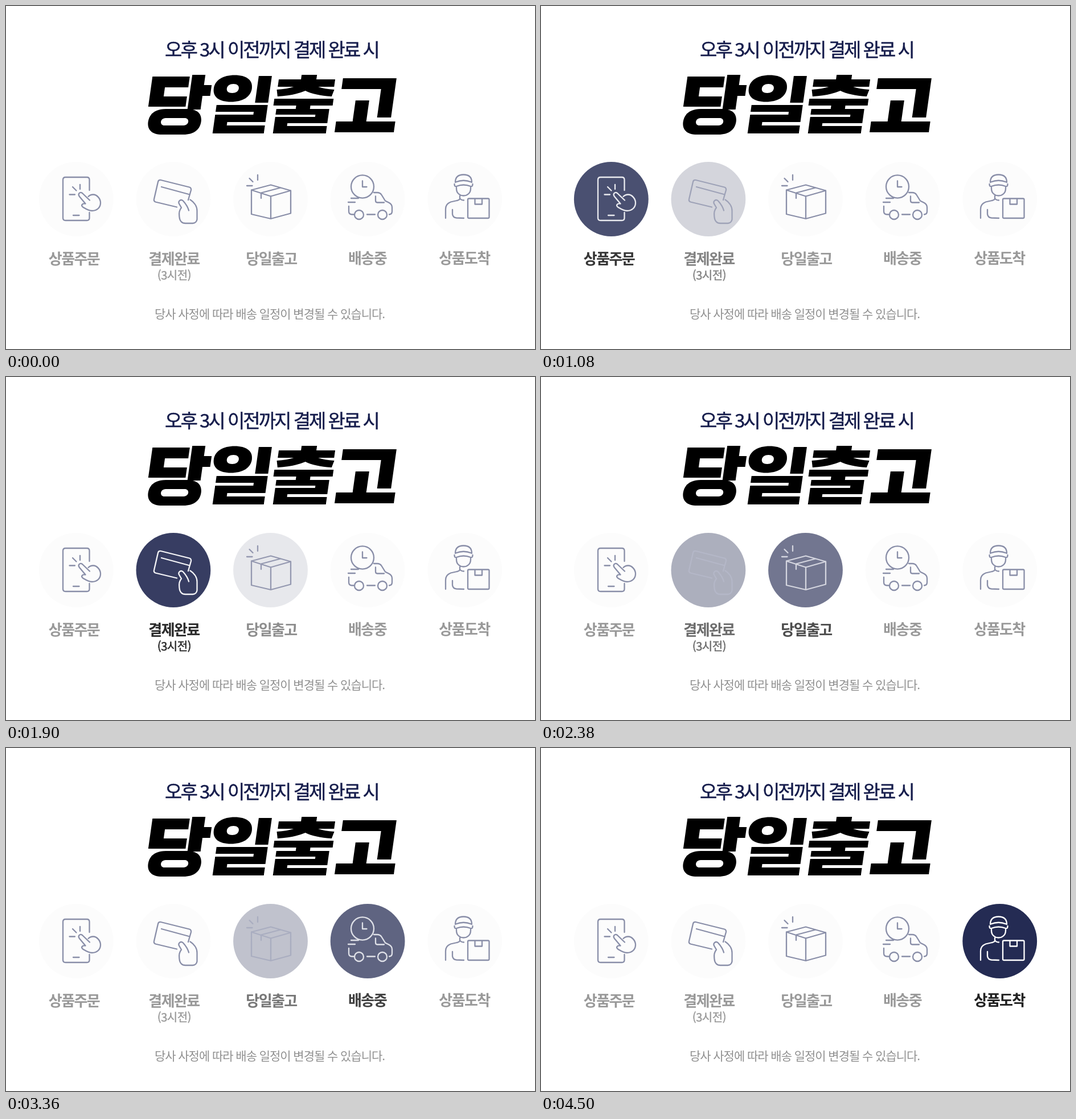
Write an HTML page that moves like this. It is 929x603 px and loops after 4.6 s.

```html
<!DOCTYPE html>
<html lang="ko">
<head>
<meta charset="utf-8">
<title>당일출고</title>
<style>
  html, body { margin: 0; width: 100%; height: 100%; overflow: hidden; background: #fff; }
  svg { display: block; width: 929px; height: 603px; }
  text { font-family: "Noto Sans CJK KR", "Noto Sans CJK", "Noto Sans KR", sans-serif; text-anchor: middle; }
  .lead { font-size: 33px; font-weight: 500; letter-spacing: -3px; fill: #161d4c; stroke: #161d4c; stroke-width: .5px; }
  .note { font-size: 21px; letter-spacing: -1.05px; fill: #909090; }
  .label { font-size: 26px; font-weight: 700; letter-spacing: -1.6px; }
  .sub { font-size: 20px; font-weight: 500; letter-spacing: -.4px; stroke-width: .4px; }
  .icon { fill: none; stroke-width: 2.3px; stroke-linecap: round; stroke-linejoin: round; }
  .off .disc { fill: #fcfcfc; }
  .off .icon { stroke: #898ea8; }
  .off text { fill: #999; }
  .off .sub { stroke: #999; }
  .on .disc { fill: #242b53; }
  .on .icon { stroke: #fff; }
  .on text { fill: #222; }
  .on .sub { stroke: #222; }
</style>
</head>
<body>
<svg viewBox="0 0 929 603">
  <text class="lead" x="466.5" y="89">오후 3시 이전까지 결제 완료 시</text>

  <!-- slanted display lettering -->
  <g role="img" aria-label="당일출고" transform="translate(31.2 0) skewX(-8)" fill-rule="evenodd">
    <path d="M243.5 124H309V143H268V159H309V177H243.5Z
             M313 121H336V139H349.5V158H336V182H313Z"/>
    <path d="M275 181H312C331 181 340 190 340 203.500S331 226 312 226H275C256 226 247 217 247 203.500S256 181 275 181Z
             M277 197C267 197 267 210 277 210H310C320 210 320 197 310 197Z"/>
    <path d="M354 145C354 130 367 121.500 387.500 121.500S421 130 421 145S408 168.500 387.500 168.500S354 160 354 145Z
             M377 145C377 150 381 153 387.500 153S398 150 398 145S394 137 387.500 137S377 140 377 145Z
             M430 123H453V170H430Z
             M363 174H453V204H386V210H453V224H363V191H430V186H363Z"/>
    <path d="M505 121H532V130H505Z"/>
    <path d="M466 129H565V142H537Q548 146 566 147L563 159Q533 157 515.500 149Q498 157 468 159L465 147Q483 146 494 142H466Z"/>
    <path d="M463 163H567V175H528V182H503V175H463Z"/>
    <path d="M469 181H562V206H492V211H562V224H469V195H539V191H469Z"/>
    <path d="M578.500 127H672.500V196H648V146H578.500Z
             M606 166H630V203H681V222H577V203H606Z"/>
  </g>

  <g id="steps"></g>

  <text class="note" x="463" y="548.500">당사 사정에 따라 배송 일정이 변경될 수 있습니다.</text>
</svg>

<script>
const phone = `
  M146.500 324V305.500Q146.500 301 142 301H104.500Q100 301 100 305.500V372.500Q100 377 104.500 377H142Q146.500 377 146.500 372.500V363
  M118 368H128.500 M117 318L123.500 324.500 M130 314V322 M111.500 331.500H121
  M147 341.500L134 329C130 326 125.500 330 129 335L139.500 347.500C134 346.500 131 350.500 135 353.500
  C140 356.500 144 360 151 360C160 360 166 354 166 346
  C166 339 160 331.500 153 331.500C149 331.500 146.500 333 144.500 335`;

const card = `
  M300 353.500L262.500 344.500Q259 343 260 339.500L267 309Q268 305 272 306
  L322 318.500Q325.500 319.500 325 323.500L320 341 M273 318L321 331
  M321 359.500C319 352 315 347 311 342.500C307 339 301 343 304.500 348.500L308 354.500
  C302.500 361 304 367 304.500 371C305 378 309 382 315 382H328C332 382 335 379 335.500 375V360
  C335.500 351 329 344 323.500 340.500`;

const box = `
  M431 323.500L465 314.500L500 324.500L465 334.500ZV366L465 374L500 364.500V324.500 M465 334.500V374
  M448 338V328.500L482 319.500
  M427.500 303L433.500 309 M442 297V306 M423 316H432.500`;

const van = `
  M606 317.500a20 20 0 1 0 40 0a20 20 0 1 0 -40 0 M626 307.500V318H633.500
  M606 338H619 M601 345H613
  M602 352V361Q602 366.500 608 366.500H611
  M612 367a8 8 0 1 0 16 0a8 8 0 1 0 -16 0 M653 367a8 8 0 1 0 16 0a8 8 0 1 0 -16 0
  M634 366.500H648
  M646 328H652Q657 328 659.500 332L666 342.500L673 346Q678 349 678 354V361Q678 366 673 366.500
  M649 334.500V342Q649 345.500 652 345.500H664`;

const courier = `
  M789 310C789 300 795 296.500 803.500 296.500S818 300 818 310
  M790 309.500Q803.500 304 817 309.500
  M787.500 313Q787.500 318 791 317Q803.500 312 816 317Q819.500 318 819.500 313
  M791 319V321C791 329 797 333.500 803.500 333.500S816 329 816 321V319
  M797 334V338Q797 341 792 342L781 344.500Q772 348 772 357V373
  M797 338Q799 341.500 804 341.500
  M784 358V366Q785 372 791 372.500L804 373
  M813 338.500H846.500Q848.500 338.500 848.500 340.500V371Q848.500 373 846.500 373H813Q811 373 811 371V340.500Q811 338.500 813 338.500Z
  M823.500 339V348.500H836V339`;

const stages = [
  { icon: phone, label: "상품주문", x: 119.5, y: 453.5 },
  { icon: card, label: "결제완료", x: 295, y: 453.5, sub: "(3시전)" },
  { icon: box, label: "당일출고", x: 466, y: 453.5 },
  { icon: van, label: "배송중", x: 634.5, y: 452.5 },
  { icon: courier, label: "상품도착", x: 805, y: 452.5 }
];

const layer = (s, i, state) => `
  <g class="${state}">
    <circle class="disc" cx="${123.3 + 170.6 * i}" cy="339.5" r="65.4"/>
    <path class="icon" d="${s.icon}"/>
    <text class="label" x="${s.x}" y="${s.y}">${s.label}</text>
    ${s.sub ? `<text class="sub" x="${s.x + .5}" y="480.5">${s.sub}</text>` : ""}
  </g>`;

const root = document.getElementById("steps");
root.innerHTML = stages.map((s, i) => layer(s, i, "off") + layer(s, i, "on")).join("");
const lit = root.querySelectorAll(".on");

const LOOP = 4600, SPAN = 900, TICKS = 11;

// Each span holds its first tick for 100 ms and the other ten for 80 ms.
function progress(t) {
  const u = t % SPAN;
  const tick = u < 100 ? 0 : 1 + Math.floor((u - 100) / 80);
  return Math.floor(t / SPAN) + tick / TICKS;
}

// A stage brightens over its own span and dims over the next one.
function draw() {
  const p = progress(performance.now() % LOOP);
  lit.forEach((g, i) => {
    g.style.opacity = Math.max(0, 1 - Math.abs(p - i - 1));
  });
  requestAnimationFrame(draw);
}
draw();
</script>
</body>
</html>
```
